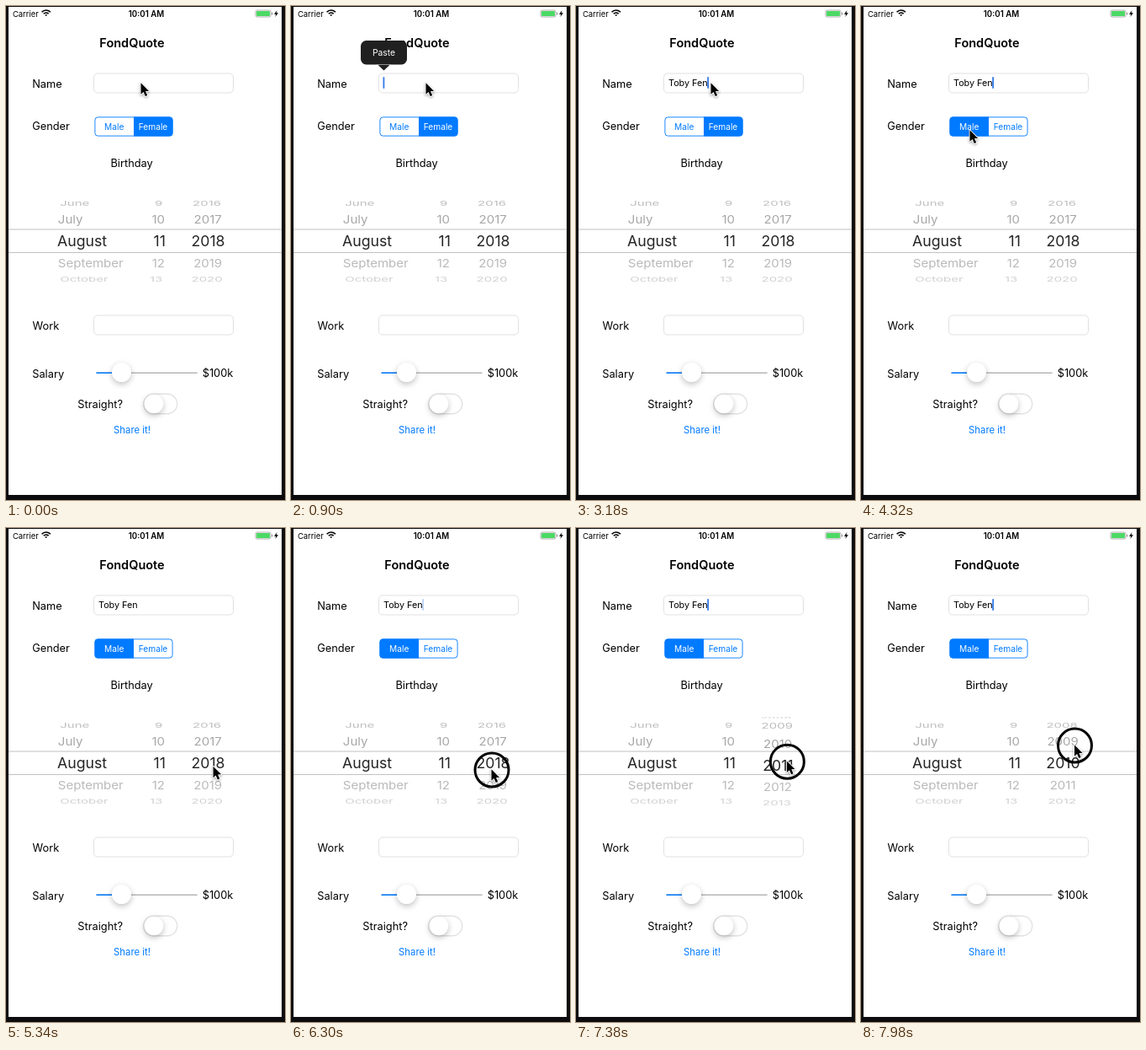
An HTML page with a canvas for the animation above (8000 ms loop, 332x586 px).

```html
<!DOCTYPE html>
<html lang="en">
<head>
<meta charset="utf-8">
<title>Profile form</title>
<style>
  html, body { margin: 0; width: 100%; height: 100%; overflow: hidden; background: #0c0c0e; }
  canvas { display: block; width: 332px; height: 586px; }
</style>
</head>
<body>
<canvas id="stage"></canvas>
<script>
const W = 332, H = 586, LOOP = 8000;
const BLUE = '#007aff', FONT = 'Inter, "Liberation Sans", sans-serif';
const canvas = document.getElementById('stage');
const ctx = canvas.getContext('2d');
const dpr = window.devicePixelRatio || 1;
canvas.width = W * dpr;
canvas.height = H * dpr;

const FULL_NAME = 'Toby Fen';
const KEY_TIMES = [1140, 1680, 1860, 2040, 2460, 2760, 2940, 3120];
const MONTHS = ['May', 'June', 'July', 'August', 'September', 'October', 'November'];
const PRESSES = [[420, 480], [3960, 4020], [4860, 4980], [5940, 6600], [7020, 7440], [7920, 8000]];
// time, x, y
const POINTER = [
  [3420, 160, 91], [3900, 129, 147], [4380, 129, 147], [4860, 247, 282],
  [5220, 247, 282], [5820, 238, 286], [6330, 238, 286], [6600, 238, 336],
  [6900, 248.5, 253], [7260, 248.5, 253], [7440, 251, 284], [7840, 253.5, 257]
];

const clamp = v => Math.max(0, Math.min(1, v));
const ramp = (t, a, b) => clamp((t - a) / (b - a));
const smooth = p => p * p * (3 - 2 * p);
const easeOut = p => 1 - (1 - p) * (1 - p);
const mix = (a, b, p) => a + (b - a) * p;

function pointerAt(t) {
  let [, x, y] = POINTER[0];
  for (let i = 1; i < POINTER.length; i++) {
    const p = smooth(ramp(t, POINTER[i - 1][0], POINTER[i][0]));
    x = mix(x, POINTER[i][1], p);
    y = mix(y, POINTER[i][2], p);
  }
  return [x, y];
}

function yearAt(t) {
  if (t < 6600) return 2018 - 2 * smooth(ramp(t, 6340, 6620));
  if (t < 7260) return mix(2016, 2011.6, easeOut(ramp(t, 6600, 7040)));
  return mix(2011.6, 2010, easeOut(ramp(t, 7260, 7740)));
}

function caretAt(t) {
  if (t < 3180) return ramp(t, 60, 240);
  const p = ((t - 3180) / 800) % 1;
  return p < .65 ? 1 - ramp(p, .5, .65) : ramp(p, .85, 1);
}

function text(s, x, y, size, { color = '#000', align = 'left', weight = 400 } = {}) {
  ctx.font = `${weight} ${size}px ${FONT}`;
  ctx.textAlign = align;
  ctx.fillStyle = color;
  ctx.fillText(s, x, y);
}

function box(x, y, w, h, r, fill, stroke, line = 1) {
  ctx.beginPath();
  ctx.roundRect(x, y, w, h, r);
  if (fill) { ctx.fillStyle = fill; ctx.fill(); }
  if (stroke) { ctx.strokeStyle = stroke; ctx.lineWidth = line; ctx.stroke(); }
}

function poly(points, fill) {
  ctx.beginPath();
  points.forEach(([x, y]) => ctx.lineTo(x, y));
  ctx.closePath();
  ctx.fillStyle = fill;
  ctx.fill();
}

function shadow(alpha, blur, offset) {
  ctx.shadowColor = `rgba(0,0,0,${alpha})`;
  ctx.shadowBlur = blur * dpr;
  ctx.shadowOffsetY = offset * dpr;
}

function knob(x, y, r) {
  ctx.save();
  shadow(.25, 7, 2.5);
  ctx.beginPath();
  ctx.arc(x, y, r, 0, Math.PI * 2);
  ctx.fillStyle = '#fff';
  ctx.fill();
  ctx.restore();
}

function statusBar() {
  text('Carrier', 8, 12.5, 9.4);
  text('10:01 AM', 167, 12.5, 9.7, { align: 'center', weight: 600 });
  ctx.strokeStyle = '#000';
  ctx.lineWidth = 1.7;
  for (const r of [1, 4, 7]) {
    ctx.beginPath();
    ctx.arc(47.7, 12, r, -Math.PI * .76, -Math.PI * .24);
    ctx.stroke();
  }
  box(297, 5, 18, 8, 2, null, '#9a9a9a', .8);
  box(298, 6, 16, 6, 1, '#4cd964');
  box(316, 7.5, 1.3, 3, .6, '#9a9a9a');
  poly([[322.5, 5], [319, 9.7], [321.3, 9.7], [320.3, 13], [324, 8.3], [321.7, 8.3]], '#000');
}

function segments(male) {
  ctx.save();
  ctx.beginPath();
  ctx.roundRect(105.5, 131.5, 93, 23, 3.8);
  ctx.clip();
  ctx.fillStyle = BLUE;
  ctx.fillRect(male ? 105 : 152, 131, 47, 24);
  ctx.restore();
  box(105.9, 131.9, 92.2, 22.2, 3.5, null, BLUE, .9);
  text('Male', 128.7, 147, 10.2, { align: 'center', color: male ? '#fff' : BLUE });
  text('Female', 175, 147, 10.2, { align: 'center', color: male ? BLUE : '#fff' });
}

// One wheel column: plain rows on the drum, enlarged rows inside the band.
function column(value, label, x, align, lean) {
  const step = .5, radius = 54, mid = 279;
  const rows = (big) => {
    for (let i = Math.round(value) - 3; i <= Math.round(value) + 3; i++) {
      const d = i - value, angle = d * step;
      if (Math.abs(angle) > 1.48) continue;
      const squash = Math.cos(angle), size = big ? 17.7 : 15;
      ctx.save();
      ctx.translate(x + (big ? 0 : lean * (1 - squash)), mid + radius * Math.sin(angle));
      ctx.scale(1, squash);
      const tone = big ? .86 : Math.max(.1, .44 - .09 * Math.abs(d) - (d > 0 ? .07 : 0));
      text(label(i), 0, size * .364, size, { align, color: `rgba(0,0,0,${tone})` });
      ctx.restore();
    }
  };
  const clipped = (big, ...areas) => {
    ctx.save();
    ctx.beginPath();
    areas.forEach(([y, h]) => ctx.rect(3, y, 325, h));
    ctx.clip();
    rows(big);
    ctx.restore();
  };
  clipped(false, [215, 50], [293, 50]);
  clipped(true, [265, 28]);
}

function picker(year) {
  column(3, i => MONTHS[i] || '', 61, 'left', 7);
  column(11, String, 190, 'right', -8);
  column(year, String, 240.5, 'center', -3);
  ctx.fillStyle = '#c2c2c2';
  ctx.fillRect(3, 264.5, 325, 1);
  ctx.fillRect(3, 292, 325, 1);
}

function sliderAndSwitch() {
  box(107.3, 434.4, 120.5, 1.7, .8, '#b6b6b6');
  box(107.3, 434.4, 30, 1.7, .8, BLUE);
  knob(137.5, 434.5, 11.5);
  box(163.7, 460.2, 40, 23.6, 11.8, '#fff', '#e2e2e2', 1.4);
  knob(176, 472, 11.3);
}

function nameField(t) {
  const typed = FULL_NAME.slice(0, KEY_TIMES.filter(k => k <= t).length);
  text(typed, 110, 95, 10.8);
  const x = 109.5 + ctx.measureText(typed).width;
  ctx.globalAlpha = caretAt(t);
  box(x, 84, 1.8, 14, .9, '#3478e8');
  ctx.globalAlpha = 1;
}

function pasteMenu(t) {
  const alpha = ramp(t, 700, 880) * (1 - ramp(t, 1140, 1370));
  if (!alpha) return;
  ctx.globalAlpha = alpha;
  ctx.beginPath();
  ctx.roundRect(83, 41, 55, 28.5, 6.5);
  ctx.moveTo(102.5, 69);
  ctx.lineTo(110.5, 76.5);
  ctx.lineTo(118.5, 69);
  ctx.fillStyle = '#202021';
  ctx.fill();
  text('Paste', 110.5, 59, 10.3, { align: 'center', color: '#fff' });
  ctx.globalAlpha = 1;
}

function pointer(t) {
  const [x, y] = pointerAt(t);
  if (PRESSES.some(([a, b]) => t >= a && t < b)) {
    ctx.beginPath();
    ctx.arc(x + 1, y + 1, 20, 0, Math.PI * 2);
    ctx.strokeStyle = '#000';
    ctx.lineWidth = 3;
    ctx.stroke();
  }
  const arrow = [[0, 0], [0, 13.5], [3.1, 10.7], [5.3, 15.8], [7.7, 14.8], [5.5, 9.8], [9.6, 9.6]];
  ctx.save();
  ctx.translate(x + .5, y + .3);
  ctx.save();
  shadow(.4, 3, 1);
  ctx.strokeStyle = '#fff';
  ctx.lineWidth = 1.8;
  ctx.lineJoin = 'round';
  ctx.beginPath();
  arrow.forEach(([px, py]) => ctx.lineTo(px, py));
  ctx.closePath();
  ctx.stroke();
  ctx.restore();
  poly(arrow, '#000');
  ctx.restore();
}

function draw(t) {
  ctx.setTransform(dpr, 0, 0, dpr, 0, 0);
  ctx.fillStyle = '#0c0c0e';
  ctx.fillRect(0, 0, W, H);
  ctx.fillStyle = '#fff';
  ctx.fillRect(3, 1, 325, 579);

  statusBar();
  text('FondQuote', 150, 49, 14.5, { align: 'center', weight: 600 });
  [['Name', 31.2, 97], ['Gender', 31.2, 147], ['Birthday', 124.5, 190.5], ['Work', 31.5, 384],
   ['Salary', 31.2, 440.5], ['$100k', 233.7, 440], ['Straight?', 85.3, 477]]
    .forEach(([s, x, y]) => text(s, x, y, 12.8));
  text('Share it!', 150, 506.5, 11.3, { align: 'center', color: BLUE });

  box(104.5, 80, 166, 23, 4.5, '#fff', '#e1e1e1');
  box(104.5, 367, 166, 23, 4.5, '#fff', '#e1e1e1');
  nameField(t);
  segments(t >= 4020);
  picker(yearAt(t));
  sliderAndSwitch();
  pasteMenu(t);
  pointer(t);
}

const start = performance.now();
function tick() {
  draw((performance.now() - start) % LOOP);
  requestAnimationFrame(tick);
}
tick();
</script>
</body>
</html>
```
